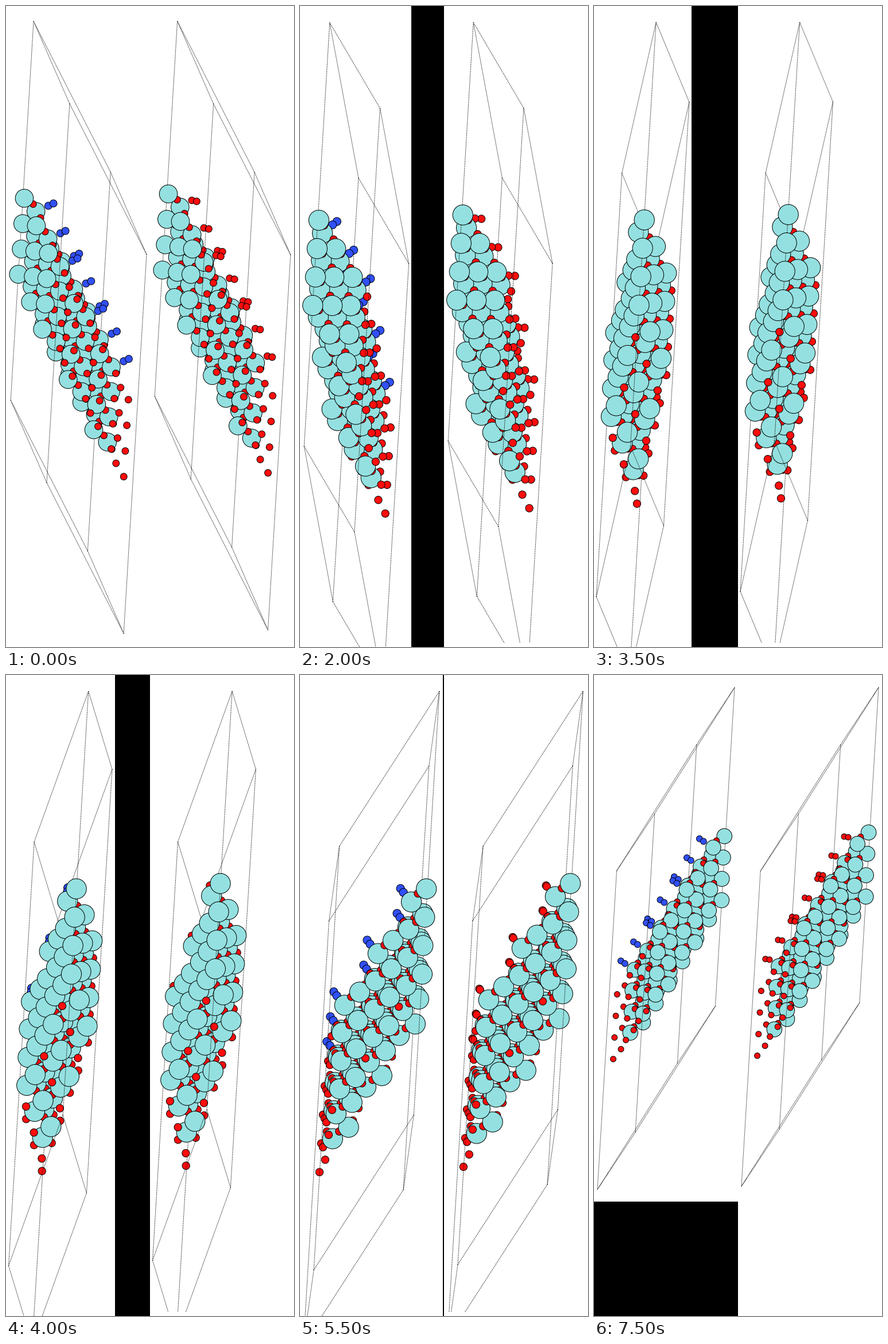
Write a matplotlib script that moves like this. It is 502 px wide and 1115 px high and loops after 8 s.

```python
import numpy as np
import matplotlib.pyplot as plt
from matplotlib.animation import FuncAnimation
from matplotlib.collections import PathCollection
from matplotlib.patches import Rectangle
from matplotlib.path import Path

W, H, PANEL = 502, 1115, 251
FRAMES, STEP = 16, 12          # degrees of turn per frame
LEAN, TILT = 0.0605, 0.16      # screen lean and foreshortening of the axis
PAD = 1.05
DOT = 3.0                      # pitch of the dotted cell edges

ZR = (17.6, "#94E0E0")
OX = (6.6, "#FF0D0D")
NI = (7.1, "#3050F8")


def polar(r, deg, h):
    t = np.radians(deg)
    return np.array([r * np.cos(t), r * np.sin(t), h])


A = polar(98.5, -36.6, 146.25)
B = polar(178, 19.6, 292.5)


def column(x, y, h, pitch):
    return [(x, y, h + pitch * i) for i in range(4)]


ZR_SITES = column(0, 0, 0, 49.35)[:3] + [
    (-2.5, 0, 148),
    (24.2, 11.3, 26), (26.3, 11.8, 73.9), (25.3, 11, 123), (25.5, 10.3, 171.8)]
OX_SITES = (column(17.7, 2.9, 10.7, 49.2) + column(33.6, -7.2, 35.1, 49)
            + column(44.7, 7.2, 64.3, 49.1) + column(61.2, 3.7, 86.3, 49.9))
N2 = [(47.6, 9.8, 13.3), (57.2, 8.5, 8.0)]
O2 = [(46.4, 12.6, 11.8), (55.8, 5.8, 12.0)]


class Slab:
    """A 3 x 3 slab in its cell, with one molecule per surface unit."""

    def __init__(self, height, base, molecule, kind):
        origin = np.array([2.8, 0, base])
        groups = [(ZR_SITES, ZR), (OX_SITES, OX), (molecule, kind)]
        pos, radii, colors = [], [], []
        for i in range(3):
            for j in range(3):
                for sites, (r, color) in groups:
                    for site in sites:
                        pos.append(origin + i * A / 3 + j * B / 3 + site)
                        radii.append(r)
                        colors.append(color)
        self.pos, self.radii, self.colors = np.array(pos), np.array(radii), colors
        c = np.array([0, 0, height])
        self.corners = np.array([i * A + j * B + k * c for i in (0, 1)
                                 for j in (0, 1) for k in (0, 1)])
        self.starts, self.ends = self.edges([A, B, c])

    @staticmethod
    def edges(vecs):
        starts, ends = [], []
        for n, v in enumerate(vecs):
            u, w = vecs[n - 1], vecs[n - 2]
            count = int(np.linalg.norm(v) / DOT)
            t = 2 * np.arange(count)[:, None] / (2 * count - 1)
            for i in (0, 1):
                for j in (0, 1):
                    p = i * u + j * w + t * v
                    starts.append(p)
                    ends.append(p + v / (2 * count - 1))
        return np.concatenate(starts), np.concatenate(ends)


def project(pts, angle):
    """Turn about the long axis; return screen x, screen y and depth."""
    x, y, h = pts.T
    c, s = np.cos(angle), np.sin(angle)
    p, q = x * c - y * s, x * s + y * c
    return np.column_stack([p - LEAN * h, LEAN * p - TILT * q + h,
                            q + 0.164 * h])


CIRCLE = Path.unit_circle()


def build(slab, k, left):
    """Sorted paths and fills, plus the size of the picture."""
    angle = np.radians(STEP * k)
    atoms = project(slab.pos, angle)
    corners = project(slab.corners, angle)[:, :2]
    p0, p1 = project(slab.starts, angle), project(slab.ends, angle)

    r = slab.radii[:, None]
    lo = np.minimum(corners.min(0), (atoms[:, :2] - r).min(0))
    hi = np.maximum(corners.max(0), (atoms[:, :2] + r).max(0))
    span = hi - lo
    scale = min(1, PANEL / (PAD * span[0]))
    size = span * PAD * scale
    shift = span * (PAD - 1) / 2 - lo

    def place(xy):
        return (xy + shift) * scale + (left, 0)

    # edge dots inside an atom are not drawn
    mid = (p0 + p1) / 2
    dist = ((mid[:, None] - atoms[None]) ** 2).sum(2)
    shown = ~(dist < slab.radii ** 2).any(1)
    p0, p1, mid = p0[shown], p1[shown], mid[shown]

    items = []
    for pos, rad, color in zip(atoms, slab.radii, slab.colors):
        verts = CIRCLE.vertices * rad * scale + place(pos[:2])
        items.append((pos[2], Path(verts, CIRCLE.codes), color))
    for a, b, m in zip(place(p0[:, :2]), place(p1[:, :2]), mid):
        items.append((m[2], Path([a, b]), "none"))
    items.sort(key=lambda item: -item[0])
    return [i[1] for i in items], [i[2] for i in items], size


slabs = [Slab(737, 344, N2, NI), Slab(728, 335, O2, OX)]

# the small excess keeps the pixel size from rounding down
fig = plt.figure(figsize=((W + 0.01) / 100, (H + 0.01) / 100), dpi=100,
                 facecolor="white")
ax = fig.add_axes([0, 0, 1, 1])
ax.set_xlim(0, W)
ax.set_ylim(H, 0)
ax.axis("off")

side = ax.add_patch(Rectangle((0, 0), 0, H, color="black", lw=0))
below = ax.add_patch(Rectangle((0, 0), PANEL, 0, color="black", lw=0))
layers = []
for n, bottom in enumerate((H, 1108)):
    layer = PathCollection([], edgecolors="black", linewidths=0.72)
    layer.set_snap(False)
    ax.add_collection(layer, autolim=False)
    layer.set_clip_path(Rectangle((n * PANEL, 0), PANEL, bottom,
                                  transform=ax.transData))
    layers.append(layer)


def update(k):
    for n, (slab, layer) in enumerate(zip(slabs, layers)):
        paths, fills, size = build(slab, k, n * PANEL)
        layer.set_paths(paths)
        layer.set_facecolor(fills)
        if n == 0:
            width = min(PANEL, int(size[0] + 0.5))
            height = min(H, int(size[1]))
            side.set_bounds(width, 0, PANEL - width, H)
            below.set_bounds(0, height, PANEL, H - height)
            side.set_visible(width < PANEL)
            below.set_visible(height < H)
    return [side, below, *layers]


anim = FuncAnimation(fig, update, frames=FRAMES, interval=500,
                     repeat=True, repeat_delay=0, blit=False)
plt.show()
```
